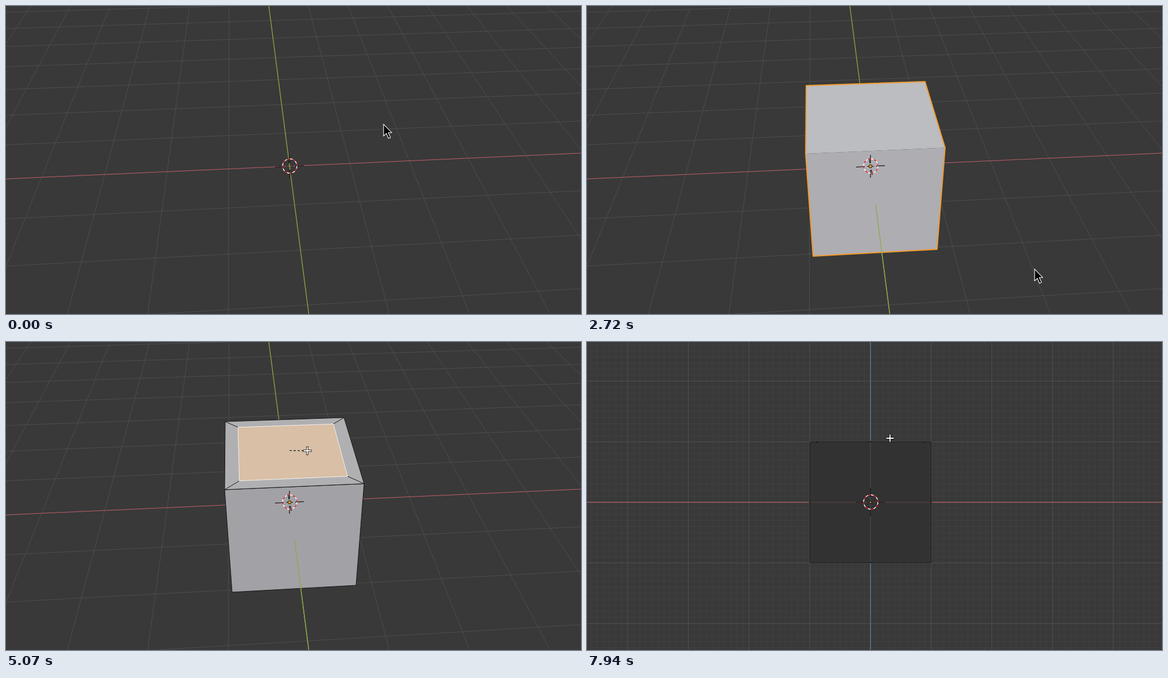
Write an HTML page that moves like this. It is 1002 by 538 pixels and loops after 8 s.

```html
<!DOCTYPE html>
<html lang="zh-CN">
<head>
<meta charset="utf-8">
<title>Viewport modelling</title>
<style>
html, body { margin: 0; width: 100%; height: 100%; overflow: hidden; background: #393939; }
svg { display: block; width: 100%; height: 100%; }
text { font: 13px "DejaVu Sans", "Noto Sans CJK SC", "Noto Sans CJK JP", "Noto Sans CJK", sans-serif; fill: #e6e6e6; }
</style>
</head>
<body>
<svg id="stage" viewBox="0 0 1002 538"></svg>
<script>
const LOOP = 8000, W = 1002, H = 538, UNIT = 105.8;
const $ = id => document.getElementById(id);
const line = (x1, y1, x2, y2, color, extra = '') =>
  `<line x1="${x1}" y1="${y1}" x2="${x2}" y2="${y2}" stroke="${color}" ${extra}/>`;
const path = (d, attrs = '') => `<path d="${d}" ${attrs}/>`;
const poly = (pts, attrs = '') => `<polygon points="${pts.join(' ')}" ${attrs}/>`;
const group = (id, body, attrs = '') => `<g id="${id}" ${attrs}>${body}</g>`;
const circle = (x, y, r, attrs = '') => `<circle cx="${x}" cy="${y}" r="${r}" ${attrs}/>`;
const rect = (x, y, w, h, attrs = '') => `<rect x="${x}" y="${y}" width="${w}" height="${h}" ${attrs}/>`;
const label = (x, y, s, attrs = '') => `<text x="${x}" y="${y + 4.7}" ${attrs}>${s}</text>`;

// Perspective floor: lines meet in two vanishing points on a level horizon.
function floor() {
  const horizon = -523, ink = '#4d4d4d';
  let out = '';
  for (let k = -8; k <= 9; k++) if (k) out += line(458 + 69.1 * k, 0, 527.6 + 140.2 * k, H, ink);
  const rowY = (k, base, step) => horizon + 1 / (base + step * k);
  for (let k = -3; k <= 9; k++) {
    const color = k ? ink : '#bf5d6b';
    out += line(0, rowY(k, .0012121, .0000944), W, rowY(k, .0012821, .0000995), color);
  }
  return out + line(458, 0, 527.6, H, '#8aab45', 'stroke-width="1.3"');
}

function flatGrid() {
  let minor = '', major = '';
  for (let k = -50; k <= 50; k++) {
    const x = 494 + k * UNIT / 10, y = 280 + k * UNIT / 10, d = `M${x} 0V${H}M0 ${y}H${W}`;
    if (k % 10) minor += d; else major += d;
  }
  return path(minor, 'stroke="#404040"') + path(major, 'stroke="#505050"') +
    line(0, 280, W, 280, '#a55b60', 'stroke-width="1.3"') +
    line(494, 0, 494, H, '#5079ae', 'stroke-width="1.3"');
}

// Cube corners on screen
const A = [382, 139], B = [589, 132], C = [624, 247.5], D = [381, 258], E = [394, 437], F = [610, 425];

function squareToQuad([ax, ay], [bx, by], [cx, cy], [dx, dy]) {
  const px = bx - cx, py = by - cy, qx = dx - cx, qy = dy - cy;
  const sx = ax - bx + cx - dx, sy = ay - by + cy - dy, den = px * qy - py * qx;
  const g = (sx * qy - sy * qx) / den, h = (px * sy - py * sx) / den;
  return (u, v) => {
    const w = 1 + g * u + h * v;
    return [(ax + (bx - ax + g * bx) * u + (dx - ax + h * dx) * v) / w,
            (ay + (by - ay + g * by) * u + (dy - ay + h * dy) * v) / w];
  };
}
const onTop = squareToQuad(A, B, C, D);

function cursor3d(perspective) {
  const arms = perspective
    ? 'M469 281.3L484 280.5M504 279.6L519 278.8M494 260V274M494 286V300M491.5 266L493 275M495.5 286L497 295'
    : 'M469 280H484M504 280H519M494 255V270M494 290V305';
  const ring = (color, offset) => circle(494.5, 279.5, 12.5,
    `fill="none" stroke="${color}" stroke-width="1.4" stroke-dasharray="4.91" stroke-dashoffset="${offset}"`);
  return path(arms + 'M488 280H491M497 280H500', 'stroke="#151515" stroke-width="1.2"') +
    ring('#fff', 0) + ring('#e8222b', 4.91);
}

const stroke = (d, w = 1.4) => path(d, `fill="none" stroke="currentColor" stroke-width="${w}"`);
const fill = d => path(d, 'fill="currentColor"');
const dot = (x, y, r) => circle(x, y, r, 'fill="currentColor"');
const hoop = r => circle(0, 0, r, 'fill="none" stroke="currentColor" stroke-width="1.4"');

const addItems = [
  ['网格', 208, 1, stroke('M-6.5-5.5H6.5L0 6Z', 3.2)],
  ['曲线', 233, 1, stroke('M-8-5C1-7 8-4 6 1Q3 6-8 5', 3.2)],
  ['面', 258, 1, fill('M-8 7V0Q-4 0-4-7H8V0Q3 0 3 7Z')],
  ['融球', 283, 1, dot(-1.5, 1.5, 6.5) + dot(5.5, -5, 3)],
  ['文本', 308, 0, '<text y="8" text-anchor="middle" style="font:bold 25px \'DejaVu Serif\',serif;fill:currentColor">a</text>'],
  ['蜡笔', 333, 1, stroke('M-8 1C-7-8 2-7-1-2L-6 3C-7 7-1 6 2 1C5-4 9-2 5 2Q1 5 4 7', 2.5)],
  ['<tspan text-decoration="underline">A</tspan>rmature', 369, 0, stroke('M-8-2H8M0-3L-5 8M0-3L5 8', 3) + dot(0, -5.5, 3)],
  ['晶格', 394, 0, fill('M-5-7H0L-1-1H-7ZM2-7H8L7-1H1ZM-7 1H-1L-2 7H-8ZM1 1H7L5 7H0Z')],
  ['空物体', 430, 1, stroke('M0-8V2L-8 6M0 2L8 5', 3.2)],
  ['图像', 455, 1, path('M-8-8H8V8H-8ZM-6 5H6L1-3L-2 1L-4-1ZM3-6V-3H6V-6Z', 'fill="currentColor" fill-rule="evenodd"')],
  ['灯光', 491, 1, dot(0, -2, 6.5) + stroke('M-3 5.5H3M-2 8H2', 1.8) + path('M-3-3L0 0L3-3M0 0V4', 'stroke="#222" fill="none"')],
  ['光照探头', 516, 1, fill('M-4-2H5V8H-4ZM6-3L8-5V5L6 7ZM-3-3L0-5H7L5-3Z') +
    dot(-7, -6, 1.4) + dot(-2, -8, 1.3) + dot(4, -8, 1.3) + dot(-7, 0, 1.3) + dot(-7, 5, 1.3)]
];
const meshItems = [
  ['平面', 207, 0, stroke('M-7.5-7.5H7.5V7.5H-7.5Z')],
  ['立方体', 232, 0, stroke('M-7.5-3H3V7.5H-7.5ZM-7.5-3L-3.5-7.5H7.5L3-3M7.5-7.5V3L3 7.5')],
  ['圆环', 257, 0, hoop(7.8)],
  ['经纬球', 282, 0, hoop(7.8) + stroke('M-8 0Q0 4 8 0M0-8Q-4 0 0 8', 1.2)],
  ['棱角球', 307, 0, stroke('M0-8L7.5-4V4L0 8L-7.5 4V-4ZM0-4L5 3.5H-5ZM0-8V-4L7.5-4L5 3.5L7.5 4M-7.5-4L0-4M-7.5-4L-5 3.5L-7.5 4M-5 3.5L0 8L5 3.5', 1.1)],
  ['柱体', 332, 0, stroke('M-6-5A6 2.5 0 0 1 6-5A6 2.5 0 0 1-6-5V5A6 2.5 0 0 0 6 5V-5')],
  ['锥体', 357, 0, stroke('M0-7.5L8 4Q0 9-8 4Z')],
  ['环体', 382, 0, stroke('M-8.5 0A8.5 6 0 0 1 8.5 0A8.5 6 0 0 1-8.5 0ZM-3.5-1.5Q0 2 3.5-1.5')],
  ['栅格', 418, 0, stroke('M-7.5-7.5H7.5V7.5H-7.5ZM-3-7V7M3-7V7M-7-3H7M-7 3H7', 1.2)],
  ['猴头', 443, 0, dot(0, 0, 7)]
];

function menuRows(items, left, color) {
  return items.map(([name, y, sub, icon]) =>
    `<g transform="translate(${left + 21} ${y})" color="${color}">${icon}</g>` + label(left + 38, y, name) +
    (sub ? path(`M${left + 213} ${y - 3.5}L${left + 221} ${y + .5}L${left + 213} ${y + 4.5}Z`, 'fill="#a3a3a3"') : '')).join('');
}
const rules = (left, ys) => ys.map(y => line(left + 2, y, left + 225, y, '#3d3d3d')).join('');
const highlight = (id, x, y) => rect(x, y, 223, 24, `id="${id}" fill="#4f76b3"`);

function pieMenu() {
  const button = (id, x, y, w, name, icon) =>
    rect(x, y - 12, w, 24, `id="${id}" rx="5" fill="#2b2b2b" stroke="#1c1c1c"`) +
    `<g transform="translate(${x + 17} ${y}) scale(.85)" color="#ddd">${icon}</g>` + label(x + 33, y, name);
  return circle(692, 178, 15, 'fill="none" stroke="#242424" stroke-width="6"') +
    path('M681.4 167.4A15 15 0 0 0 681.4 188.6', 'fill="none" stroke="#4f76b3" stroke-width="5"') +
    button('pieWire', 461.5, 178, 80, '线框', hoop(7) + stroke('M-7 0H7M0-7V7', 1)) +
    button('pieSolid', 842, 178, 80, '实体', dot(0, 0, 7)) +
    button('pieLook', 652, 328, 80, '预览', hoop(7) + fill('M0-7A7 7 0 0 1 0 7Z')) +
    button('pieRender', 652, 28.5, 80, '渲染', hoop(7) + dot(0, 0, 4)) +
    button('pieXray', 463, 72, 123, '切换透视模式', stroke('M-7-7H3V3H-7ZM-3-3H7V7H-3Z')) +
    button('pieOverlay', 798, 72, 110, '切换叠加层', hoop(6) + dot(3, -3, 4));
}

const squareBox = attrs => rect(388.5, 174.5, 211, 211, attrs);
$('stage').innerHTML =
  rect(0, 0, W, H, 'fill="#393939"') +
  group('perspective', floor() +
    group('objectCube',
      poly([A, B, C, D], 'fill="#bcbdc1"') + poly([D, C, F, E], 'fill="#aeadb2"') +
      poly([A, B, C, F, E, D], 'fill="none" stroke="#f29a2c" stroke-width="2" stroke-linejoin="round"')) +
    group('editCube',
      poly([D, C, F, E], 'id="front"') + poly([A, B, C, D], 'fill="#b0b0b2" stroke="#151515"') +
      path('', 'id="spokes" stroke="#151515"') + poly([], 'id="inner" fill="#d8bfa6" stroke="#f4f1ee"')) +
    group('frontAxis', line(503, 347, 527.6, H, '#8aab45', 'stroke-width="1.3"')) + cursor3d(true)) +
  group('ortho', flatGrid() +
    group('solidBox', squareBox('fill="#b8b8ba" stroke="#1b1b1b"') + line(414, 173.5, 574, 173.5, '#d2cdc8')) +
    group('wireBox', squareBox('fill="#323232" stroke="#1f1f1f"') +
      line(389, 280, 600, 280, '#8f5257', 'stroke-dasharray="1 1"') +
      line(494, 175, 494, 385, '#527099', 'stroke-dasharray="1 1"') +
      [[400, 175], [494, 174], [587, 175], [494, 385], [388.5, 280], [599.5, 280]]
        .map(([x, y]) => rect(x - 1, y - 1, 2, 2, 'fill="#101010"')).join('')) + cursor3d(false)) +
  circle(494, 280, 2.8, 'id="origin" fill="#f29a2c" stroke="#151515"') +
  group('addMenu', rect(495, 154, 227, 400, 'rx="5" fill="#212121"') +
    label(506, 172, '添加', 'style="fill:#a0a0a0"') + highlight('meshRow', 497, 196.5) +
    rules(495, [191.5, 352.5, 413.5, 474.5, 535.5]) + menuRows(addItems, 495, '#e39250')) +
  group('meshMenu', rect(723, 190, 224, 271, 'rx="5" fill="#212121"') + highlight('subRow', 723.5, 195) +
    rules(721, [401.5]) + menuRows(meshItems, 721, '#dcdcdc')) +
  group('pie', pieMenu()) +
  path('', 'id="leash" stroke="#151515" stroke-width="1.2" stroke-dasharray="4 3"') +
  group('arrow', path('M0 .5V21L4.8 16.6L8.6 25.2L12 23.8L8.2 15.2H14Z', 'fill="#000" stroke="#fff" stroke-width="1.1"')) +
  group('cross', path('M-7.5 0H7.5M0-7.5V7.5', 'stroke="#111" stroke-width="3.4"') +
    path('M-6.5 0H6.5M0-6.5V6.5', 'stroke="#fff" stroke-width="1.8"'));

// Bursts of change: start time and number of 80 ms steps
const bursts = [[0, 1], [680, 1], [830, 1], [980, 7], [1610, 1], [1770, 3], [2080, 11], [2960, 11], [3840, 1], [4440, 1],
  [4670, 11], [5550, 2], [5780, 3], [6090, 5], [6710, 1], [7240, 4], [7630, 3], [7940, 1]];
function stepTime(t) {
  const [start, count] = bursts.filter(b => b[0] <= t).pop();
  return start + 80 * Math.min(count - 1, Math.floor((t - start) / 80));
}

const mouseKeys = [[0, 658, 206], [830, 658, 206], [1140, 684, 219], [1460, 771, 234], [1610, 771, 234], [1930, 654, 211],
  [2240, 480, 87], [2400, 313, 150], [2560, 430, 390], [2720, 780, 459], [2880, 776, 457], [3760, 536, 187],
  [3840, 548, 181], [4590, 548, 181], [5070, 525, 190], [5150, 520, 190], [5230, 520, 190], [5470, 671, 187],
  [5630, 693, 176], [5700, 693, 176], [5940, 476, 195], [6010, 476, 195], [6410, 693, 178], [7240, 693, 178],
  [7480, 640, 176], [7630, 590, 172], [7790, 530, 167], [7940, 528, 168]];
const insetKeys = [[0, 0], [4590, 0], [5070, .105], [5150, .122]];

function track(keys, t) {
  const i = keys.findIndex(k => k[0] > t);
  if (i < 0) return keys[keys.length - 1].slice(1);
  const a = keys[i - 1], b = keys[i], p = (t - a[0]) / (b[0] - a[0]);
  return a.slice(1).map((v, n) => v + (b[n + 1] - v) * p);
}
const show = (id, on) => $(id).setAttribute('display', on ? 'inline' : 'none');
const set = (id, name, value) => $(id).setAttribute(name, value);

function render(ms) {
  const t = stepTime(ms % LOOP);
  const during = (a, b) => t >= a && t < b;
  const [mx, my] = track(mouseKeys, t), [inset] = track(insetKeys, t);
  const editing = t >= 3040, flat = t >= 6710, wire = t >= 7710;

  show('perspective', !flat);
  show('ortho', flat);
  show('objectCube', during(1610, 3040));
  show('editCube', editing && !flat);
  show('frontAxis', t >= 1610);
  show('solidBox', !wire);
  show('wireBox', wire);
  show('origin', t >= 1610);
  set('origin', 'r', wire ? 1.8 : 2.8);

  const allSelected = t < 3680;
  set('front', 'fill', allSelected ? '#cdb49d' : '#a2a1a6');
  set('front', 'stroke', allSelected ? '#f4f1ee' : '#151515');
  const far = 1 - inset;
  const inner = [onTop(inset, inset), onTop(far, inset), onTop(far, far), onTop(inset, far)];
  set('inner', 'points', inner.join(' '));
  set('spokes', 'd', [A, B, C, D].map((p, i) => `M${p}L${inner[i]}`).join(''));

  show('addMenu', during(680, 1610));
  show('meshMenu', during(830, 1610));
  show('subRow', mx > 722);
  set('subRow', 'y', my < 220 ? 195 : 220);
  show('pie', during(7240, 7710));
  set('pieWire', 'fill', t >= 7320 ? '#4f76b3' : '#2b2b2b');
  show('leash', during(4440, 5230));
  set('leash', 'd', `M494 189.5L${mx} ${my}`);

  show('arrow', !editing);
  show('cross', editing);
  set(editing ? 'cross' : 'arrow', 'transform', `translate(${mx} ${my})`);
}

const began = performance.now();
function tick() {
  render(performance.now() - began);
  requestAnimationFrame(tick);
}
tick();
</script>
</body>
</html>
```
